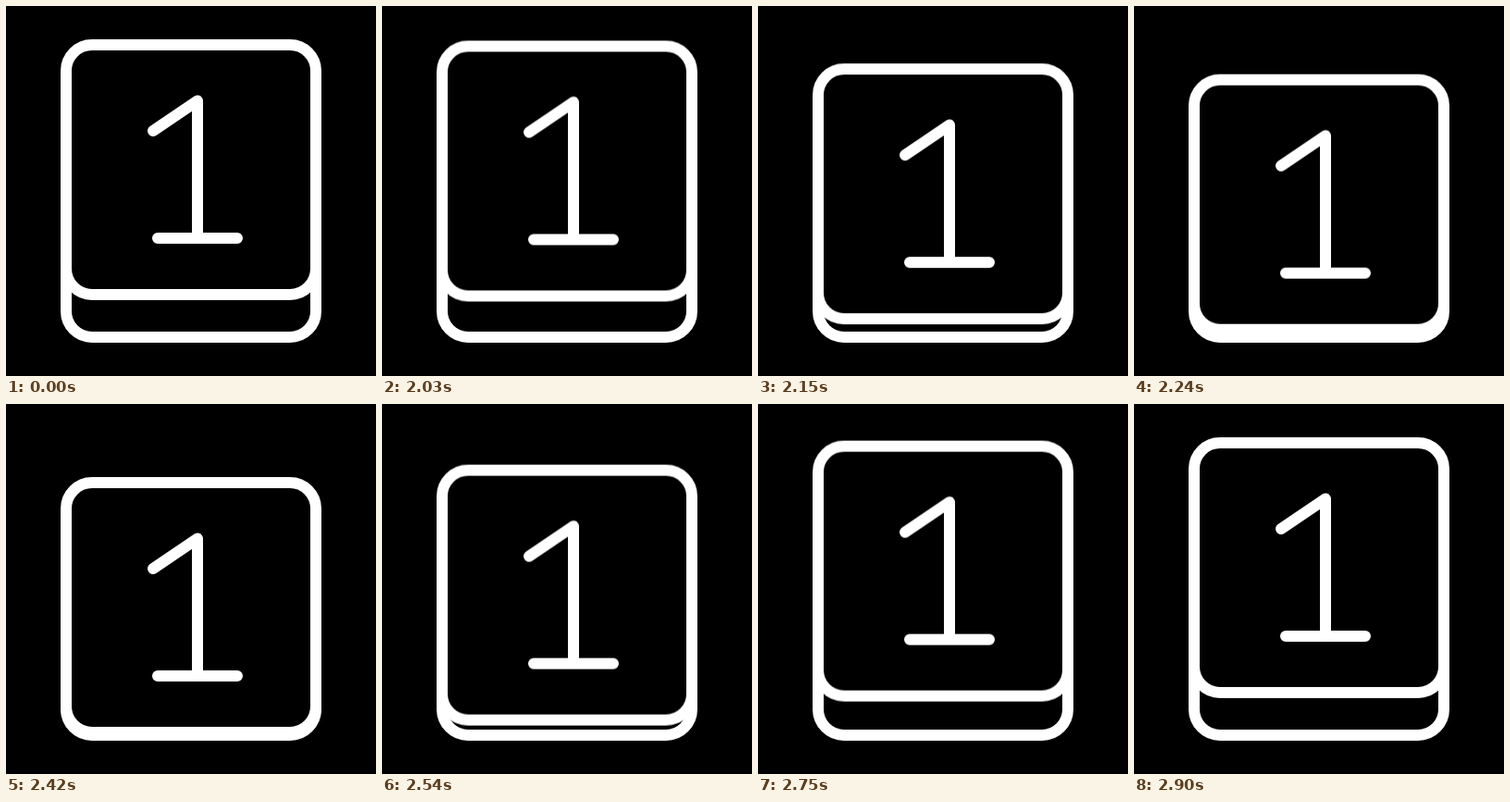
Recreate the animation shown at these times as an HTML page without scripts. Size 400x400 px, loop 2.93 s.

```html
<!DOCTYPE html>
<html lang="en">
<head>
<meta charset="utf-8">
<title>Key press</title>
<style>
  html, body {
    margin: 0;
    width: 100%;
    height: 100%;
    overflow: hidden;
    background: #000;
  }
  svg {
    display: block;
    width: 100%;
    height: 100%;
    fill: none;
    stroke: #fff;
    stroke-width: 12;
    stroke-linejoin: round;
  }
  .digit { stroke-linecap: round; }
  .cap { animation: press 2930ms linear infinite; }

  /* rest 2000 ms, press 390 ms, hold 30 ms, release 480 ms */
  @keyframes press {
    0% { transform: translateY(0); }
    68.259% {
      transform: translateY(0);
      animation-timing-function: cubic-bezier(.26, 0, .28, 1);
    }
    81.57% { transform: translateY(43px); }
    82.594% {
      transform: translateY(43px);
      animation-timing-function: cubic-bezier(.27, 0, .315, 1);
    }
    98.976%, 100% { transform: translateY(0); }
  }
</style>
</head>
<body>
<svg viewBox="0 0 400 400">
  <path d="M65 285V330a28 28 0 0 0 28 28H307a28 28 0 0 0 28-28V285"/>
  <g class="cap">
    <rect x="65" y="42" width="270" height="270" rx="28"/>
    <path class="digit" d="M159 135L207 102.500V251M164 251H250"/>
  </g>
</svg>
</body>
</html>
```
